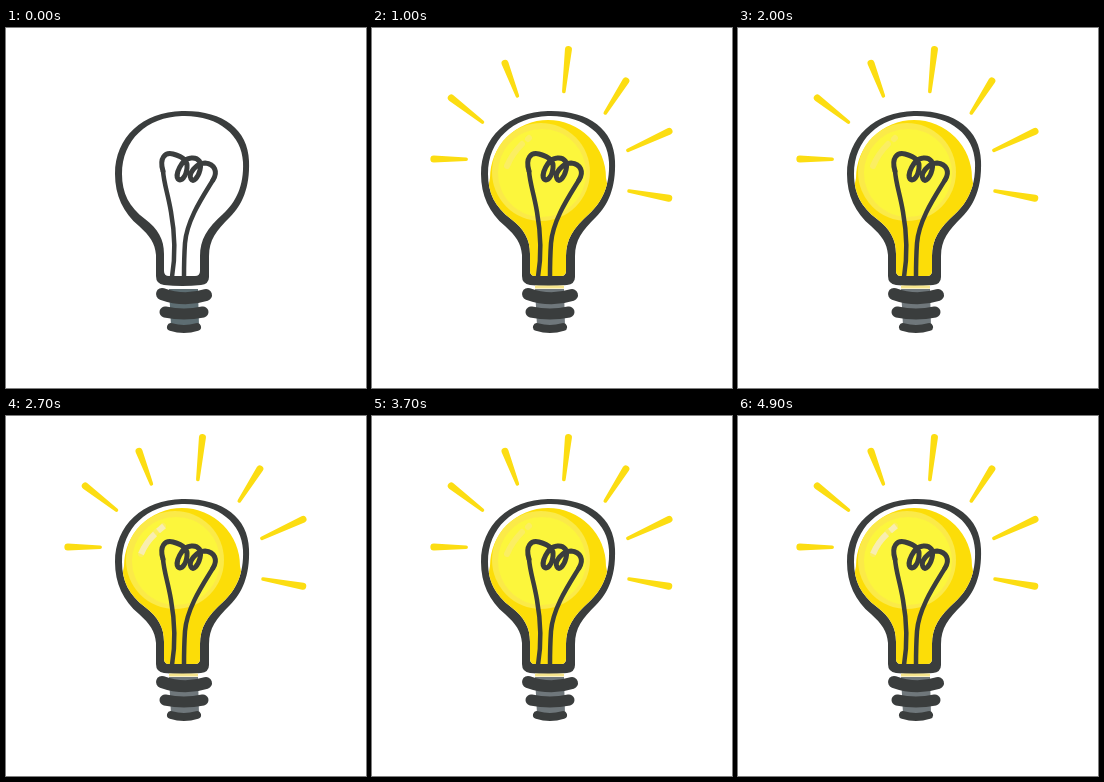
An HTML page for the animation above (5.2 s loop, 360 by 360 pixels).

```html
<!DOCTYPE html>
<html lang="en">
<head>
<meta charset="utf-8">
<title>Light bulb</title>
<style>
  html, body { margin: 0; width: 100%; height: 100%; overflow: hidden; background: #fff; }
  svg { display: block; width: 100vw; height: 100vh; }
  .ink { fill: none; stroke: #3a3d3d; stroke-linecap: round; stroke-linejoin: round; }
</style>
</head>
<body>
<svg viewBox="0 0 360 360">
  <defs>
    <path id="glass" d="M176 88C212 87 236 107 237 134C238 158 230 174 217 186C201 200 194 212 194 228V243Q194 248 189 248H163Q158 248 158 243V226C158 211 152 201 139 191C123 179 116 165 116 146C116 112 141 89 176 88Z"/>
    <clipPath id="inside"><use href="#glass"/></clipPath>
  </defs>

  <path fill="#3a3d3d" d="M176 83C216 82 242 101 243 133C244 160 236 177 224 189C210 203 203 212 203 228V249Q203 256 195 257Q176 259 158 257Q150 256 150 248V227C149 215 144 208 133 198C117 185 109 167 109 146C109 109 137 84 176 83Z"/>
  <use href="#glass" fill="#fff"/>

  <g id="glow">
    <g clip-path="url(#inside)">
      <path fill="#fcdd08" d="M118 150A58 58 0 0 1 234 150L240 180L200 250H150L112 180Z"/>
      <circle cx="169" cy="144" r="49" fill="#fbea48"/>
      <circle cx="170" cy="145" r="44" fill="#fcf63c"/>
    </g>
    <path d="M135 138Q140 126 150 116M156 111L157 110" fill="none" stroke="#fbee62" stroke-width="6" stroke-linecap="round"/>
    <path d="M163 259H192" stroke="#f6e58c" stroke-width="3"/>
  </g>
  <path id="shine" d="M135 138Q140 126 149 118M152 115L158 110" fill="none" stroke="#f8edb0" stroke-width="6"/>
  <g id="rays" fill="#fcdd12"></g>

  <path id="socket" d="M163 261H192L193 298H165Z"/>
  <g class="ink">
    <path stroke-width="12" d="M156 266Q178 274 200 267"/>
    <path stroke-width="11" d="M159 284Q178 288 197 284"/>
    <path stroke-width="8" d="M165 299Q178 303 191 299"/>
    <path stroke-width="4.500" d="M166 249C170 225 169 206 165 184C162 166 158 156 157 143M207 152C196 170 181 192 179 215Q178 230 178 249"/>
    <path stroke-width="5" d="M157 143C153 130 159 124 167 126C175 128 182 132 181 140C180 149 175 154 172 151C169 147 175 131 185 130C193 129 196 135 194 142C192 150 187 155 185 151C182 146 190 135 199 135C209 136 212 144 207 152"/>
  </g>
</svg>

<script>
  const LOOP = 5200, CYCLE = 2200, START = 500;
  const $ = id => document.getElementById(id);
  const glow = $('glow'), shine = $('shine'), rays = $('rays'), socket = $('socket');

  // Point around the middle of the bulb
  function polar(degrees, radius) {
    const a = degrees * Math.PI / 180;
    return [176 + radius * Math.cos(a), 145 + radius * Math.sin(a)];
  }

  // Tapered stroke with round ends
  function taper([x1, y1], [x2, y2], r1, r2) {
    const len = Math.hypot(x2 - x1, y2 - y1);
    const nx = (y1 - y2) / len, ny = (x2 - x1) / len;
    const at = (x, y, r) => `${x + nx * r} ${y + ny * r}`;
    return `M${at(x1, y1, r1)}A${r1} ${r1} 0 0 1 ${at(x1, y1, -r1)}` +
           `L${at(x2, y2, -r2)}A${r2} ${r2} 0 0 1 ${at(x2, y2, r2)}Z`;
  }

  // A fan of seven rays, every other one longer, with slightly uneven roots
  for (let i = 0; i < 7; i++) {
    const tip = polar(187 + 30.8 * i, 115 + 1.4 * i + (i % 2) * 6);
    const root = polar(189.5 + 30.5 * i - 2.5 * Math.sin(i * Math.PI / 3), 83);
    const path = document.createElementNS('http://www.w3.org/2000/svg', 'path');
    path.setAttribute('d', taper(tip, root, 3.5, 1.8));
    rays.append(path);
  }

  const show = (el, on) => { el.style.visibility = on ? 'visible' : 'hidden'; };

  // The bulb flickers on, then its rays blink while it stays lit.
  function draw(time) {
    const t = time % LOOP % CYCLE;
    const starting = t < START;
    const lit = !starting || Math.floor(t / 100) % 2 === 1;
    show(glow, lit);
    show(shine, lit && t < 800);
    show(rays, lit && (starting || (t - START) % 500 < 300));
    socket.setAttribute('fill', lit ? '#6f777b' : '#5d6d72');
  }

  const begin = performance.now();
  function tick() {
    draw(performance.now() - begin);
    requestAnimationFrame(tick);
  }
  tick();
</script>
</body>
</html>
```
